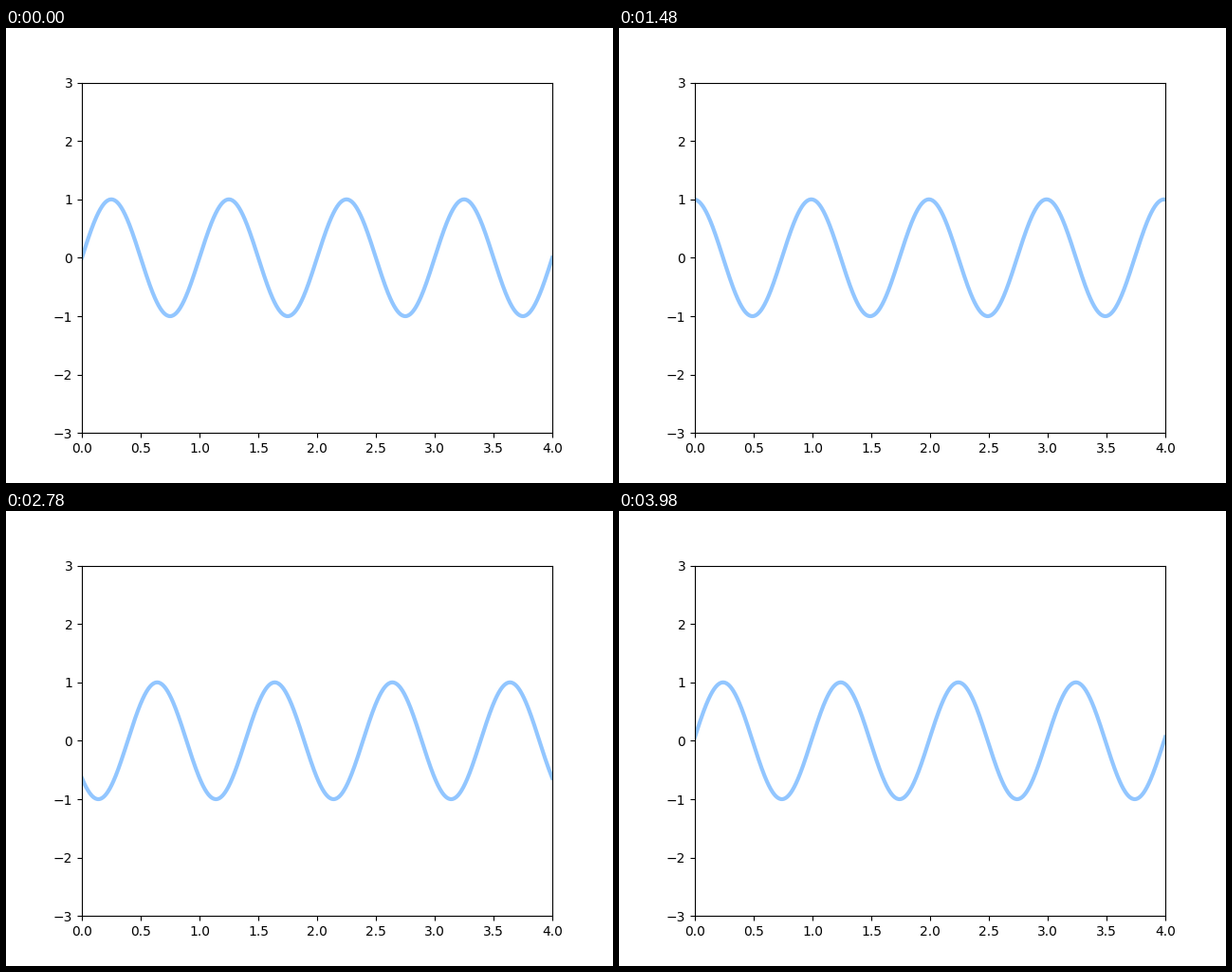
A matplotlib script that plays this animation: 640x480 px, repeating every 4 s.

```python
import numpy as np
import matplotlib.pyplot as plt
from matplotlib.animation import FuncAnimation

FRAMES = 200
INTERVAL = 20  # ms
SHIFT = 0.01   # distance the wave travels per frame

fig = plt.figure(figsize=(6.4, 4.8), dpi=100)
ax = plt.axes(xlim=(0, 4), ylim=(-3, 3))
line, = ax.plot([], [], lw=3, color="#92C6FF")
x = np.linspace(0, 4, 1000)


def init():
    line.set_data([], [])
    return line,


def update(i):
    line.set_data(x, np.sin(2 * np.pi * (x - SHIFT * i)))
    return line,


anim = FuncAnimation(fig, update, init_func=init, frames=FRAMES,
                     interval=INTERVAL, repeat=True, repeat_delay=0)
plt.show()
```
